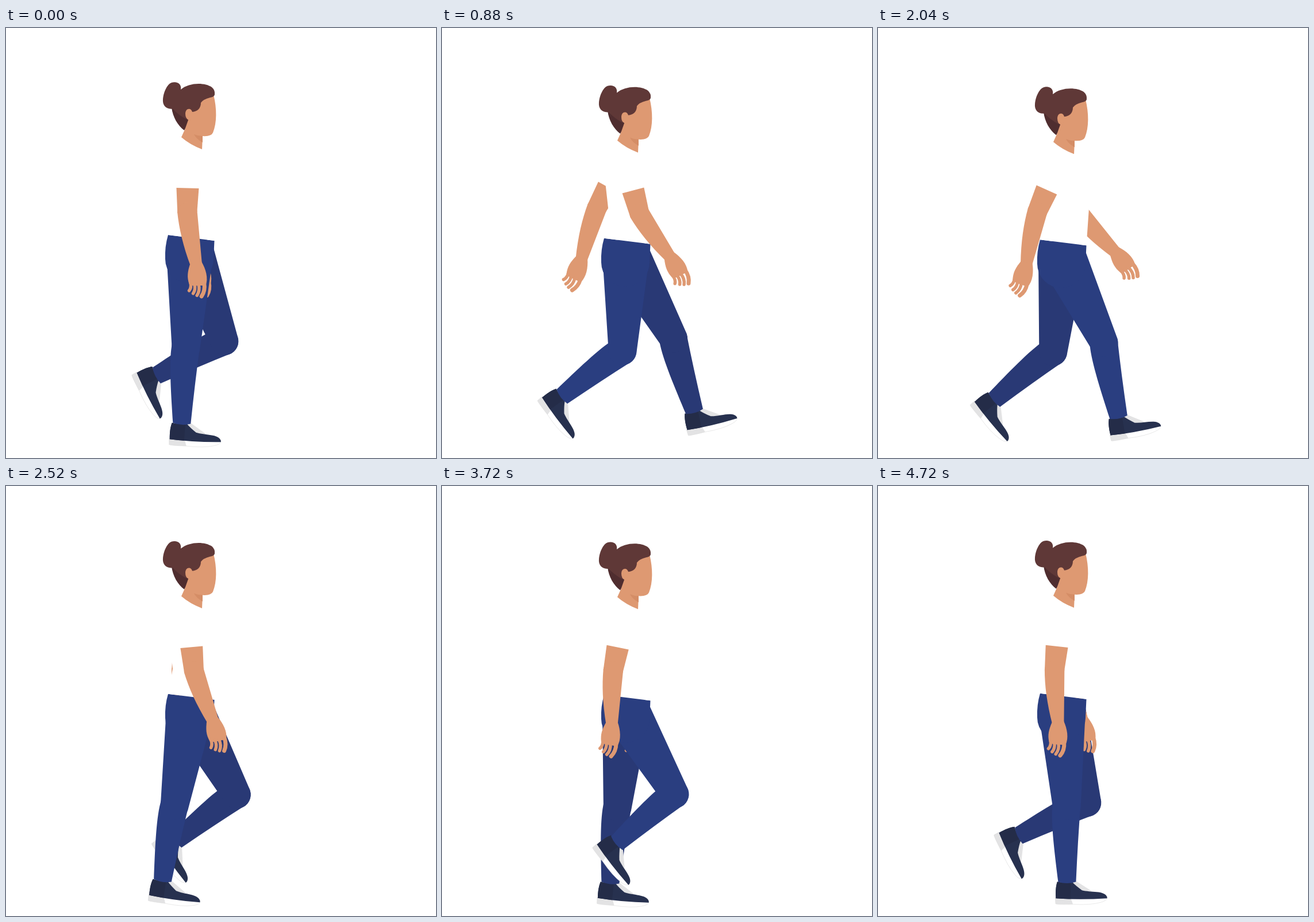
Write an HTML page with a canvas that moves like this. It is 748 by 748 pixels and loops after 4760 ms.

```html
<!DOCTYPE html>
<html lang="en">
<head>
<meta charset="utf-8">
<title>Walk cycle</title>
<style>
  html, body { margin: 0; height: 100%; overflow: hidden; background: #fff; }
  canvas { display: block; }
</style>
</head>
<body>
<canvas id="stage" width="748" height="748"></canvas>
<script>
const ctx = document.getElementById('stage').getContext('2d');
const LOOP = 4760, CYCLE = 2400, STEP = 40;
const SKIN = '#de9972', NEAR = '#2a3e80', FAR = '#293975';
const HIP = [320, 388], SHOULDER = [317.5, 219.5];
const THIGH = 168, SHIN = 133, UPPER_ARM = 101, FOREARM = 93;

// Key poses shared by both sides: phase, then angles from straight down
// (forward positive); for the foot, toe down is positive
const stride = [
  [0, -2.4, -3.1, 0],         // stand
  [560, -25, -33, 25],        // push off
  [880, -2, -53, 50],         // lift
  [1150, 18, -64.5, 61],      // fold
  [1320, 30.4, -49.8, 49],    // pass
  [1680, 43.5, -4, 5.5],      // swing
  [1855, 37, 26, -20],        // reach
  [2040, 25.8, 11.1, -13.5]]; // strike
const swing = [
  [0, -1.5, 10], [560, 24.6, 60.3], [880, 14.7, 35.5],
  [1320, -11.6, -1], [1680, -37, -24.5], [2040, -24, -11.4]];
// How far the far side runs ahead of the near side: the gait limps a little
const lead = [[0, 1187], [560, 1120], [1320, 1127], [1680, 1280], [2040, 1200]];

// Periodic cubic Hermite interpolation between key poses
function pose(keys, phase) {
  const t = phase % CYCLE, n = keys.length;
  const time = i => keys[(i + n) % n][0] + Math.floor(i / n) * CYCLE;
  const value = (i, c) => keys[(i + n) % n][c];
  const i = keys.findLastIndex(k => k[0] <= t);
  const h = time(i + 1) - time(i), u = (t - time(i)) / h;
  const slope = (j, c) => (value(j + 1, c) - value(j - 1, c)) / (time(j + 1) - time(j - 1));
  return keys[i].slice(1).map((a, k) => {
    const c = k + 1, b = value(i + 1, c), s = u * u * (3 - 2 * u);
    return a + (b - a) * s
      + h * u * (1 - u) * ((1 - u) * slope(i, c) - u * slope(i + 1, c));
  });
}

// The body sinks once per step; the first step is the shorter one
function bob(t) {
  const split = 1130;
  const u = t < split ? t / split : (t - split) / (CYCLE - split);
  return 12.5 * Math.sin(Math.PI * u) ** 1.7;
}

const rad = deg => deg * Math.PI / 180;
const along = ([x, y], deg, len) => [x + Math.sin(rad(deg)) * len, y + Math.cos(rad(deg)) * len];

function fill(color, d) {
  ctx.fillStyle = color;
  ctx.fill(new Path2D(d));
}
function stroke(color, width, d) {
  ctx.strokeStyle = color;
  ctx.lineWidth = width;
  ctx.stroke(new Path2D(d));
}
function at([x, y], deg, draw) {
  ctx.save();
  ctx.translate(x, y);
  ctx.rotate(rad(deg));
  draw();
  ctx.restore();
}

function shoe() {
  const sole = 'M-22,26 L-22,36 Q-20,37.5 8,38.5 Q38,42 56,38 Q67,36 68,31Z';
  fill('#fff', sole);
  fill('#e3e3e4', 'M-22,26 L-22,36 Q-20,37.5 8,38.5 L5,28Z');
  stroke('#dcdcdc', 0.6, sole);
  fill('#e3e3e4', 'M8,0 L15,-2 L42,17.5 Q34,19 25,16Z');
  fill('#27314f', 'M-21,26.5 C-21,14 -20,6 -17,-2 Q-4,1 9,0 Q15,7 25,15 C40,20 64,17 68,29 L68,31.5 Q20,32 -21,26.5Z');
  fill('#242c48', 'M-21,26.5 C-21,14 -20,6 -17,-2 Q-7,1 6,1 L4,29 Q-8,28 -21,26.5Z');
}

function leg(phase, color) {
  const [thigh, shin, foot] = pose(stride, phase);
  const knee = along(HIP, thigh, THIGH);
  at(along(knee, shin, SHIN), foot, shoe);
  at(knee, -shin, () => fill(color, 'M-25,0 C-28,30 -21,85 -15.5,132 Q0,137 15.5,132 Q19,60 24,0 A24.5,24.5 0 0 0 -25,0Z'));
  at(HIP, -thigh, () => fill(color, 'M-40,12 A40,40 0 0 1 40,12 L24.5,168 A24.5,24.5 0 0 1 -24.5,168Z'));
}

function hand() {
  fill(SKIN, 'M-10,-4 C-17,9 -20,18 -18,31 L-11,35 L10,38 C17,26 15,10 10,-4Z');
  stroke(SKIN, 5.5, 'M-15,28 Q-15,38 -20,42 M-9,32 Q-8,42 -14,48 M-2,34 Q-1,45 -8,52.5');
  stroke(SKIN, 7, 'M8,33 Q8,47 -0.5,55.5');
}

function arm(phase) {
  const [upper, fore] = pose(swing, phase);
  const elbow = along(SHOULDER, upper, UPPER_ARM);
  at(SHOULDER, -upper, () => fill(SKIN, 'M-19.5,59 L19.5,59 L17.5,100 L-16.5,103Z'));
  at(elbow, -fore, () => fill(SKIN, 'M-16.5,-3 C-18.5,25 -17,55 -10,94 L10,94 L17.5,4 A16,16 0 0 0 -16.5,-3Z'));
  at(along(elbow, fore, FOREARM), -fore, hand);
}

function head() {
  fill('#4f2d2f', 'M288,138 C290,155 299,170 310,178 Q317,168 320,158 L306,135Z');
  fill(SKIN, 'M361,116 C367,140 367,165 360,182 Q357,189 342,188 L341,211 Q320,203 305,190 Q312,176 317,160 L325,130Z');
  fill('#d48d66', 'M327,185 Q334,188 342,188 L342,199 Q332,194 327,185Z');
  fill('#5f3837', `M304,107 C318,95 345,94 358,103 Q364,108 363,116 Q362,120 355,121
    Q343,124 339,130 C339,140 333,145 324,146 L314,159 Q298,150 290,140.5
    C278,142 272,134 273,124 C274,112 280,98 288,95 C298,92 306,98 304,107Z`);
  fill(SKIN, 'M324,146 C322,138 312,139 312,149 Q312,158 318,160 Q325,157 324,146Z');
}

function draw(t) {
  const farPhase = t + pose(lead, t)[0];
  ctx.clearRect(0, 0, 748, 748);
  ctx.save();
  ctx.translate(0, bob(t));
  ctx.lineCap = 'round';
  leg(farPhase, FAR);
  arm(farPhase - STEP);
  leg(t, NEAR);
  fill(NEAR, 'M282,360 L362.5,370 L361,402 A42,42 0 0 1 277,402 Q276,380 282,360Z');
  fill('#fff', 'M284,200 L284,262 L290,316 L282,360 L362.5,370 L367,305 L360,200Z');
  head();
  arm(t);
  ctx.restore();
}

const start = performance.now();
function tick() {
  const t = (performance.now() - start) % LOOP;
  draw(Math.floor(t / STEP) * STEP % CYCLE);
  requestAnimationFrame(tick);
}
tick();
</script>
</body>
</html>
```
